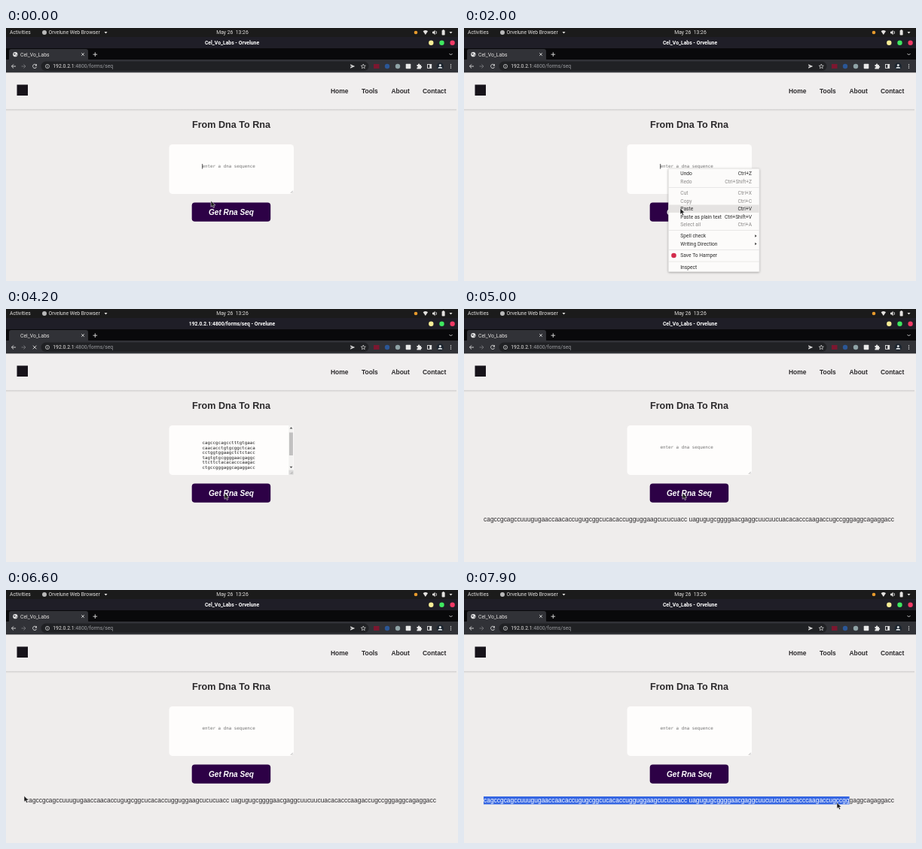
An HTML page for the animation above (8 s loop, 600x337 px).

```html
<!DOCTYPE html>
<html lang="en">
<head>
<meta charset="utf-8">
<title>Sequence form</title>
<style>
  html, body { margin: 0; width: 100%; height: 100%; overflow: hidden; background: #efedec; }
  svg { display: block; width: 100vw; height: 100vh; }
  text { white-space: pre; }
  .ui { font: 6.8px Roboto, "Open Sans", sans-serif; fill: #e4e2e0; }
  .page { font: 8.42px "Liberation Sans", Arial, sans-serif; fill: #2c2a2c; }
  .mono { font: 5.85px "DejaVu Sans Mono", monospace; fill: #222; }
  .menu { font: 6.7px Roboto, "Open Sans", sans-serif; fill: #2b2b2b; }
  .b { font-weight: 700; }
  .mid { text-anchor: middle; }
  .end { text-anchor: end; }
  .off { fill: #8d8b8a; }
  .line { fill: none; stroke: #dedede; stroke-width: .9; }
  .thin { stroke-width: .7; }
  .grip { fill: none; stroke: #8b8b8b; stroke-width: .6; }
</style>
</head>
<body>
<svg viewBox="0 0 600 337" preserveAspectRatio="none">
  <defs>
    <filter id="soft" x="-10%" y="-10%" width="120%" height="125%">
      <feDropShadow dx="0" dy=".8" stdDeviation="1.6" flood-opacity=".35"/>
    </filter>
    <linearGradient id="fade" x2="0" y2="1">
      <stop stop-color="#cfcdcd"/><stop offset="1" stop-color="#efedec"/>
    </linearGradient>
    <clipPath id="selClip"><rect id="clipBox" x="26" y="274" width="0" height="13"/></clipPath>
  </defs>

  <!-- desktop bar -->
  <rect width="600" height="60" fill="#1b1b1b"/>
  <g class="ui">
    <text x="5" y="8.4">Activities</text>
    <circle cx="51" cy="6" r="3" fill="#b9b9b9"/>
    <text x="56.5" y="8.4">Orvelune Web Browser</text>
    <path d="M130.5 5h4l-2 2.6z"/>
    <text class="mid" x="300.5" y="8.4">May 26  13:26</text>
    <circle cx="544" cy="6" r="2.3" fill="#e79a2c"/>
    <path d="M553.6 4.2Q556.8 1.9 560 4.2L556.8 9z"/>
    <path d="M566 4.8h1.5l2-2v6.4l-2-2H566z"/>
    <path class="line" d="M570.8 4q1.4 2 0 4"/>
    <rect x="578.6" y="3" width="4" height="6.4" rx=".7"/>
    <rect x="579.7" y="2.2" width="1.8" height="1"/>
    <path d="M588.5 5h4l-2 2.6z"/>
  </g>

  <!-- window frame -->
  <rect y="12" width="600" height="16" fill="#1f1e27"/>
  <text id="title" class="ui b mid" x="300" y="22.2" style="fill:#fff"></text>
  <circle cx="564.3" cy="19.7" r="3.2" fill="#f8ee97"/>
  <circle cx="578.5" cy="19.7" r="3.2" fill="#3fe860"/>
  <circle cx="592.6" cy="19.7" r="3.2" fill="#f23a66"/>
  <rect y="27" width="600" height="16" fill="#09090b"/>
  <path d="M2 43q2 0 2-2V31q0-3 3-3h99q3 0 3 3v10q0 2 2 2z" fill="#313237"/>
  <g id="globe">
    <circle cx="12.3" cy="35.2" r="3.1" fill="#e6e6e6"/>
    <path d="M10 34.2l2-1 .6 1.5-1.2 1.6zM13.4 35.7l1.4-.6-.6 1.7-1 .5z" fill="#54555a"/>
  </g>
  <text class="ui" x="19" y="37.6">Cel_Vo_Labs</text>
  <path class="line" d="M100.2 33.3l3.6 3.6m0-3.6l-3.6 3.6M115.5 35.2h5.6m-2.8-2.8v5.6M588.5 34l2 2 2-2"/>

  <!-- toolbar -->
  <rect y="42" width="600" height="18" fill="#313237"/>
  <rect x="46.5" y="44.6" width="435" height="12.5" rx="6.2" fill="#202124"/>
  <path class="line" d="M13 51H7.5m2.5-2.6L7.4 51l2.6 2.6"/>
  <path class="line" style="stroke:#77787b" d="M20.5 51H26m-2.6-2.6L26 51l-2.6 2.6"/>
  <g id="reload">
    <path class="line" d="M40.2 49.3a2.6 2.6 0 1 0 .4 2.5"/>
    <path d="M40.9 47.7v2.8h-2.8z" fill="#dedede"/>
  </g>
  <path id="stop" class="line" d="M35.8 48.7l4.6 4.6m0-4.6l-4.6 4.6"/>
  <circle class="line thin" cx="55" cy="51" r="2.6"/>
  <path class="line thin" d="M55 50.5v2m0-3.4v.6"/>
  <text class="ui" x="62.3" y="53.3">192.0.2.1<tspan fill="#9b9da1">:4800/forms/seq</tspan></text>
  <path d="M457 48.2l6.2 2.8-6.2 2.8.6-2.3 2.6-.5-2.6-.5z" fill="#dedede"/>
  <path id="star" class="line thin"/>
  <rect x="488" y="48" width="7.5" height="6" fill="#7c1730"/>
  <circle cx="506" cy="51" r="3.2" fill="#2b5796"/>
  <circle cx="520" cy="51" r="3.2" fill="#8fa3a6"/>
  <rect x="530.7" y="47.7" width="6.6" height="6.6" rx=".8" fill="#e9e9e9"/>
  <path d="M545.4 49h1.6q0-1.4 1.1-1.4t1.1 1.4h1.7v1.7q1.3 0 1.3 1.1t-1.3 1.1v1.5h-5.5v-1.7q1.3 0 1.3-1t-1.3-1z" fill="#e8e8e8"/>
  <rect class="line" x="559.5" y="48.5" width="5.2" height="5"/>
  <rect x="562.3" y="48.5" width="2.4" height="5" fill="#e8e8e8"/>
  <circle cx="576.3" cy="51" r="4.7" fill="#1d2630"/>
  <circle cx="576.3" cy="49.5" r="1.5" fill="#dfe3e6"/>
  <path d="M573.4 53.7q0-2 2.9-2t2.9 2z" fill="#dfe3e6"/>
  <g fill="#dedede"><circle cx="590.5" cy="48.7" r=".7"/><circle cx="590.5" cy="51" r=".7"/><circle cx="590.5" cy="53.3" r=".7"/></g>

  <!-- page -->
  <rect y="59.6" width="600" height="278" fill="#efedec"/>
  <rect y="59.6" width="600" height="48.6" fill="#f0eeee"/>
  <rect y="108.2" width="598" height="2.6" fill="url(#fade)"/>
  <rect x="14.5" y="75.5" width="14.5" height="14.5" fill="#17131a"/>
  <text class="page b" x="431" y="87">Home</text>
  <text class="page b" x="472" y="87">Tools</text>
  <text class="page b" x="511.5" y="87">About</text>
  <text class="page b" x="553" y="87">Contact</text>
  <text class="page b mid" x="299" y="132.5" style="font-size:12.6px">From Dna To Rna</text>
  <rect x="216.5" y="155" width="165.5" height="66" rx="4.5" fill="#fefdfc"/>
  <path id="grip" class="grip" d="M377.8 219.8l3-3m-1.2 3l1.2-1.2"/>
  <text id="hint" class="mono" x="260.5" y="186.4" style="fill:#757575">enter a dna sequence</text>
  <g id="filled">
    <g id="rows" class="mono"></g>
    <rect x="375.3" y="155" width="6.2" height="59.5" fill="#f3f2f1"/>
    <rect x="375.9" y="164.5" width="5" height="30.5" fill="#c1c0c0"/>
    <path d="M376.6 159.5h3.8l-1.9-2.2zM376.6 209.7h3.8l-1.9 2.2z" fill="#4b4b4b"/>
    <rect x="375.3" y="214.5" width="6.4" height="6.2" fill="#dbdada"/>
    <path class="grip" d="M377.6 219.8l3-3m-1.2 3l1.2-1.2"/>
  </g>
  <rect id="caret" x="260.4" width=".7" height="6.6" fill="#111"/>
  <rect x="246.7" y="232.5" width="104.5" height="25.3" rx="4" fill="#2d0146"/>
  <text class="page b mid" x="299" y="248.6" style="font-size:10.1px;font-style:italic;fill:#fff">Get Rna Seq</text>
  <g id="result">
    <text id="rna" class="page" x="26" y="283"></text>
    <rect id="mark" x="26" y="275" width="0" height="10.5" fill="#3566e2"/>
    <text id="rnaLit" class="page" x="26" y="283" style="fill:#fff" clip-path="url(#selClip)"></text>
  </g>

  <g id="menu" class="menu">
    <rect x="271.3" y="187.3" width="120.7" height="137.5" rx="1" fill="#fcfbfa" stroke="#d2d0cf" stroke-width=".4" filter="url(#soft)"/>
    <rect id="hover" x="271.6" width="120.1" height="10.4" fill="#e5e3e2"/>
  </g>
  <path id="pointer" d="M0-.7v8l1.9-1.7 1.3 2.9 1.5-.7-1.3-2.8h2.5z" fill="#1c1c1c" stroke="#fff" stroke-width=".5"/>
</svg>
<script>
const LOOP = 8000, STEP = 100;
const MENU_OPEN = 700, PASTE = 2500, CLICK = 3900, LOADED = 4600, DRAG = 6800;
const SITE = 'Cel_Vo_Labs', URL_TEXT = '192.0.2.1:4800/forms/seq', APP = ' - Orvelune';
const DNA = ['cagccgcagcctttgtgaac', 'caacacctgtgcggctcaca', 'cctggtggaagctctctacc',
             'tagtgtgcggggaacgaggc', 'ttcttctacacacccaagac', 'ctgccgggaggcagaggacc'];

// time, x, y of the pointer tip
const PATH = [
  [0, 272, 231], [300, 272, 231], [700, 271, 187], [900, 271, 187], [1000, 276, 192],
  [1200, 280, 215], [1300, 280, 215], [1600, 286, 240], [1900, 286, 240], [2000, 287, 241],
  [2200, 287, 241], [2300, 288, 240], [2500, 288, 240], [2700, 297, 242], [2800, 297, 242],
  [3200, 290, 246], [5100, 290, 246], [5300, 262, 251], [5700, 110, 275], [6000, 24, 285],
  [6200, 11, 284], [6600, 24, 275], [6700, 24, 275], [7100, 125, 284], [7600, 400, 288],
  [7900, 495, 284], [8000, 527, 284]
];

// centre line, label, shortcut, enabled
const ITEMS = [
  [194, 'Undo', 'Ctrl+Z', 1], [204.5, 'Redo', 'Ctrl+Shift+Z', 0],
  [219.7, 'Cut', 'Ctrl+X', 0], [230.2, 'Copy', 'Ctrl+C', 0], [240.7, 'Paste', 'Ctrl+V', 1],
  [251.2, 'Paste as plain text', 'Ctrl+Shift+V', 1], [261.7, 'Select all', 'Ctrl+A', 0],
  [277, 'Spell check', '', 1], [287.5, 'Writing Direction', '', 1],
  [303, 'Save To Hamper', '', 1], [318.5, 'Inspect', '', 1]
];

const $ = id => document.getElementById(id);
const show = (id, on) => $(id).setAttribute('visibility', on ? 'visible' : 'hidden');

function add(parent, tag, attrs, text = '') {
  const el = document.createElementNS('http://www.w3.org/2000/svg', tag);
  for (const key in attrs) el.setAttribute(key, attrs[key]);
  el.textContent = text;
  $(parent).append(el);
}

function build() {
  const star = Array.from({ length: 10 }, (_, i) => {
    const r = i % 2 ? 1.4 : 3.2, a = i * Math.PI / 5;
    return `${474.3 + r * Math.sin(a)} ${51.2 - r * Math.cos(a)}`;
  });
  $('star').setAttribute('d', `M${star.join('L')}z`);

  DNA.forEach((row, i) => add('rows', 'text', { x: 260.5, y: 179.9 + i * 6.62 }, row));
  const rna = (DNA.slice(0, 3).join('') + ' ' + DNA.slice(3).join('')).replace(/t/g, 'u');
  $('rna').textContent = $('rnaLit').textContent = rna;

  for (const [y, label, keys, on] of ITEMS) {
    const cls = on ? '' : 'off';
    add('menu', 'text', { x: 287.3, y: y + 2.3, class: cls }, label);
    if (keys) add('menu', 'text', { x: 382, y: y + 2.3, class: 'end ' + cls }, keys);
  }
  for (const y of [212, 269.3, 295.2, 310.8])
    add('menu', 'rect', { x: 271.6, y, width: 120.1, height: .6, fill: '#dddbda' });
  for (const y of [277, 287.5])
    add('menu', 'path', { d: `M386.3 ${y - 1.8}v3.6l2.2-1.8z` });
  add('menu', 'circle', { cx: 278.5, cy: 303, r: 3.3, fill: '#d32c4c' });
}

function pointerAt(t) {
  const i = Math.max(1, PATH.findIndex(p => p[0] >= t));
  const [t0, x0, y0] = PATH[i - 1], [t1, x1, y1] = PATH[i];
  const k = (t - t0) / (t1 - t0);
  return [x0 + (x1 - x0) * k, y0 + (y1 - y0) * k];
}

function caretOn(t) {
  if (t >= CLICK) return false;
  return t < PASTE || (t - PASTE) % 1000 < 500;
}

// The highlight runs slightly ahead of the drawn pointer and snaps to letters.
function selectedWidth(t) {
  if (t < DRAG) return 0;
  const goal = pointerAt(t + 57)[0], rna = $('rna');
  let best = 26;
  for (let i = 0; i < rna.getNumberOfChars(); i++) {
    const x = rna.getStartPositionOfChar(i).x;
    if (Math.abs(x - goal) < Math.abs(best - goal)) best = x;
  }
  return best - 26;
}

function draw(t) {
  const [x, y] = pointerAt(t);
  const loading = t >= CLICK + STEP && t < LOADED;
  const filled = t >= PASTE && t < LOADED;
  const menu = t >= MENU_OPEN && t < PASTE;
  const row = ITEMS.find(item => item[3] && Math.abs(item[0] - y) < 5.3);

  $('pointer').setAttribute('transform', `translate(${x} ${y})`);
  $('title').textContent = (loading ? URL_TEXT : SITE) + APP;
  show('globe', !loading);
  show('reload', !loading);
  show('stop', loading);
  show('filled', filled);
  show('hint', !filled);
  show('grip', !filled);
  show('caret', caretOn(t));
  $('caret').setAttribute('y', filled ? 214.2 : 181);
  show('menu', menu);
  show('hover', menu && row);
  if (row) $('hover').setAttribute('y', row[0] - 5.2);
  show('result', t >= LOADED);

  const width = selectedWidth(t);
  $('mark').setAttribute('width', width);
  $('clipBox').setAttribute('width', width);
}

build();
let start = null, last = -1;
function tick() {
  const now = performance.now();
  start ??= now;
  const t = Math.floor((now - start) % LOOP / STEP) * STEP;
  if (t !== last) draw(last = t);
  requestAnimationFrame(tick);
}
tick();
</script>
</body>
</html>
```
